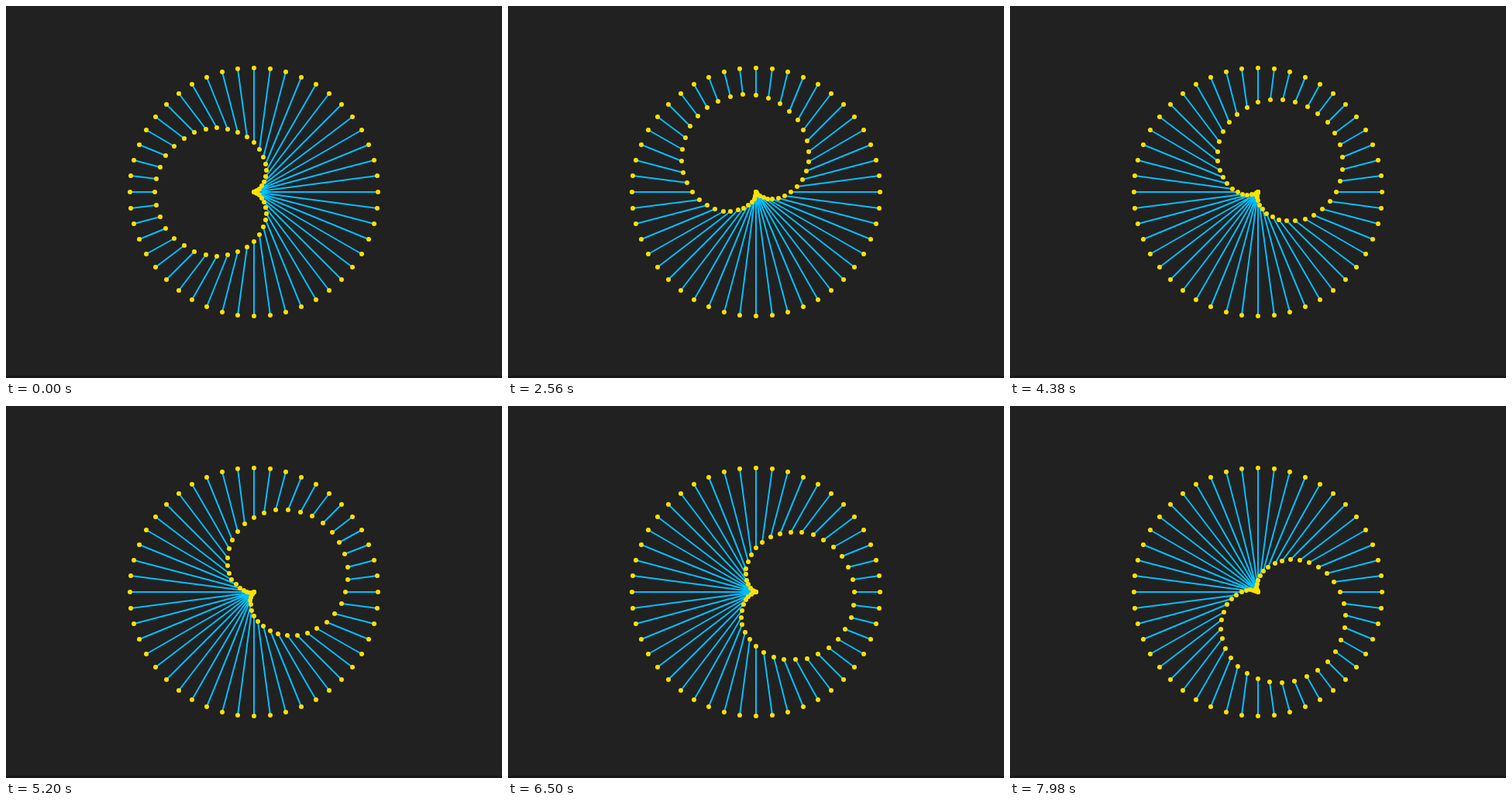
These frames come from a looping animation (640x480 px, 8000 ms). An HTML page with a canvas:

```html
<!DOCTYPE html>
<html lang="en">
<head>
<meta charset="utf-8">
<title>Cardioid spokes</title>
<style>
  html, body { margin: 0; width: 100%; height: 100%; overflow: hidden; background: #212121; }
  canvas { display: block; }
</style>
</head>
<body>
<canvas id="stage" width="640" height="480"></canvas>
<script>
const ctx = document.getElementById('stage').getContext('2d');
const LOOP = 8000, STEP = 20, TURN_PER_STEP = 0.01;
const SPOKES = 48, OUTER = 160, INNER = 64;
const CENTER = { x: 320, y: 240 };

const polar = (radius, angle) => ({
  x: Math.round(CENTER.x + radius * Math.cos(angle)),
  y: Math.round(CENTER.y + radius * Math.sin(angle))
});

function dot({ x, y }) {
  ctx.beginPath();
  ctx.arc(x, y, 3, 0, 2 * Math.PI);
  ctx.fill();
}

function draw(time) {
  const phase = Math.floor(time / STEP) * TURN_PER_STEP;
  const spokes = Array.from({ length: SPOKES }, (_, i) => {
    const angle = i * 2 * Math.PI / SPOKES;
    // Cardioid whose cusp points along the phase angle
    const radius = Math.floor(INNER * (1 - Math.cos(angle - phase)) + 1e-9);
    return [polar(OUTER, angle), polar(radius, angle)];
  });

  ctx.fillStyle = '#212121';
  ctx.fillRect(0, 0, 640, 480);
  ctx.fillStyle = '#1b161b';
  ctx.fillRect(0, 477, 640, 3);

  ctx.strokeStyle = '#00bfff';
  ctx.lineWidth = 2;
  ctx.beginPath();
  for (const [outer, inner] of spokes) {
    ctx.moveTo(outer.x, outer.y);
    ctx.lineTo(inner.x, inner.y);
  }
  ctx.stroke();

  ctx.fillStyle = '#ffe100';
  spokes.flat().forEach(dot);
}

const start = performance.now();
function tick() {
  draw((performance.now() - start) % LOOP);
  requestAnimationFrame(tick);
}
tick();
</script>
</body>
</html>
```
